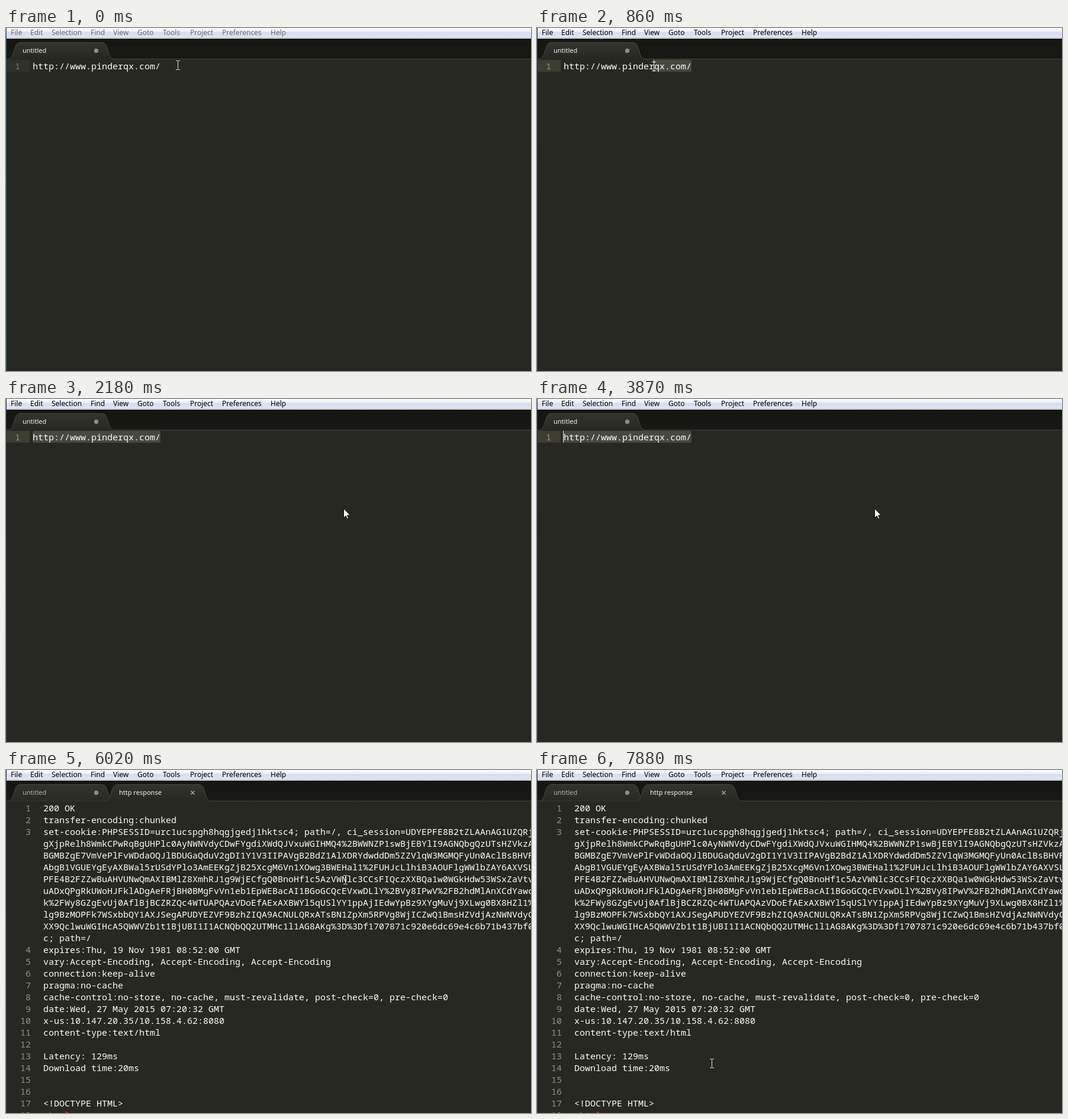
Write an HTML page that moves like this. It is 887 px wide and 581 px high and loops after 8000 ms.

```html
<!DOCTYPE html>
<html lang="en">
<head>
<meta charset="utf-8">
<title>Editor</title>
<style>
  html, body { margin: 0; width: 100%; height: 100%; overflow: hidden; background: #272822; }
  svg { display: block; width: 887px; height: 581px; }
  text { white-space: pre; }
  .code { font: 15px "Noto Sans Mono", "DejaVu Sans Mono", monospace; fill: #fcfcf8; }
  .num { fill: #8f908a; text-anchor: end; }
  .tag { fill: #f92672; }
  .menu { font: 12px "Noto Sans", "Open Sans", sans-serif; fill: #000; }
  .label { font: 11px "Noto Sans", "Open Sans", sans-serif; fill: #f4f4f0; }
  .idle .menu { fill: #6d6d6d; }
  .idle .gutter { fill: #30312a; }
  .idle .first { fill: #8c7468; }
  .idle .edge { fill: url(#edgeIdle); }
  .gutter { fill: #3e3d32; }
  .edge { fill: url(#edge); }
  .tab { stroke: #45463f; }
  .response .back { fill: url(#backTab); }
  .response .back + .label { fill: #b4b4ae; }
  .page2, .response .page1 { display: none; }
  .response .page2 { display: inline; }
</style>
</head>
<body>
<svg id="stage" class="idle" viewBox="0 0 887 581">
  <defs>
    <linearGradient id="bar" x2="0" y2="1">
      <stop offset="0" stop-color="#fbfcfe"/>
      <stop offset=".42" stop-color="#e8edf7"/>
      <stop offset=".46" stop-color="#d5dced"/>
      <stop offset="1" stop-color="#e1e6f6"/>
    </linearGradient>
    <linearGradient id="strip" x2="0" y2="1">
      <stop offset="0" stop-color="#151611"/>
      <stop offset="1" stop-color="#181914"/>
    </linearGradient>
    <linearGradient id="frontTab" x2="0" y2="1">
      <stop offset="0" stop-color="#33342e"/>
      <stop offset="1" stop-color="#272822"/>
    </linearGradient>
    <linearGradient id="backTab" x2="0" y2="1">
      <stop offset="0" stop-color="#32332d"/>
      <stop offset="1" stop-color="#292a24"/>
    </linearGradient>
    <linearGradient id="edgeIdle" x2="0" y2="1">
      <stop offset="0" stop-color="#1d4d7c"/>
      <stop offset="1" stop-color="#2f6b6c"/>
    </linearGradient>
    <linearGradient id="edge" x2="0" y2="1">
      <stop offset="0" stop-color="#1a3450"/>
      <stop offset="1" stop-color="#2a4c58"/>
    </linearGradient>
    <path id="tabShape" d="M5 52.5C12 50 12 42 15 34C17 28 19 24.5 25 24.5H161C167 24.5 169 28 171 34C174 42 174 50 181 52.5"/>
  </defs>

  <rect width="887" height="581" fill="#272822"/>
  <rect y="18" width="887" height="34" fill="url(#strip)"/>
  <rect width="887" height="16" fill="url(#bar)"/>
  <rect y="16" width="887" height="1" fill="#b6bccc"/>
  <rect y="17" width="887" height="1" fill="#f0f0f0"/>
  <rect y="52" width="887" height="1" fill="#43443d"/>
  <g id="menu"></g>

  <use href="#tabShape" class="tab back" fill="url(#frontTab)"/>
  <text class="label" x="28" y="42">untitled</text>
  <circle cx="152.5" cy="38.5" r="3.7" fill="#8b8b85"/>
  <g class="page2">
    <use href="#tabShape" class="tab" x="164" fill="url(#frontTab)"/>
    <rect x="171" y="52" width="172" height="2" fill="#272822"/>
    <text class="label" x="191" y="42">http response</text>
    <path d="M312.5 35.5l6 6m0-6l-6 6" stroke="#a3a39d" stroke-width="1.5"/>
  </g>
  <g class="page1">
    <rect x="7" y="52" width="172" height="2" fill="#272822"/>
    <rect class="gutter" x="1" y="54" width="39" height="20"/>
    <rect id="selection" y="54" height="20" rx="2" fill="#49483e"/>
    <text class="code num first" x="24" y="70">1</text>
    <text class="code" x="45" y="70">http://www.pinderqx.com/</text>
    <rect id="caret" y="54" width="1" height="20" fill="#f8f8f0"/>
  </g>
  <g id="response" class="page2"></g>
  <rect class="edge" width="1" height="581"/>

  <path id="beam" d="M0 .5h3m1 0h3M3.5 1v14M0 15.5h3m1 0h3" stroke="#e4e4e0" fill="none"/>
  <path id="arrow" d="M.5 .7V16.4L4.2 12.9L6.6 18.5L8.9 17.5L6.5 12H11.5Z" fill="#fff" stroke="#000"/>
</svg>

<script>
const $ = id => document.getElementById(id);
const LOOP = 8000, LEFT = 45, CHAR = 9, URL_END = 24;

function addText(parent, cls, x, y, string) {
  const node = document.createElementNS("http://www.w3.org/2000/svg", "text");
  node.setAttribute("class", cls);
  node.setAttribute("x", x);
  node.setAttribute("y", y);
  node.textContent = string;
  parent.append(node);
}

const menu = { File: 8, Edit: 41, Selection: 77, Find: 143, View: 181, Goto: 222,
  Tools: 265, Project: 311, Preferences: 365, Help: 447 };
for (const name in menu) addText($("menu"), "menu", menu[name], 12, name);

// A leading tab marks a wrapped row, which has no line number.
const rows = `200 OK
transfer-encoding:chunked
set-cookie:PHPSESSID=urc1ucspgh8hqgjgedj1hktsc4; path=/, ci_session=UDYEPFE8B2tZLAAnAG1UZQRj
\tgXjpRelh8WmkCPwRqBgUHPlc0AyNWNVdyCDwFYgdiXWdQJVxuWGIHMQ4%2BWWNZP1swBjEBYlI9AGNQbgQzUTsHZVkzA
\tBGMBZgE7VmVePlFvWDdaOQJlBDUGaQduV2gDI1Y1V3IIPAVgB2BdZ1AlXDRYdwddDm5ZZVlqW3MGMQFyUn0AclBsBHVF
\tAbgB1VGUEYgEyAXBWal5rUSdYPlo3AmEEKgZjB25XcgM6Vn1XOwg3BWEHal1%2FUHJcLlhiB3AOUFlgWWlbZAY6AXVSL
\tPFE4B2FZZwBuAHVUNwQmAXIBMlZ8XmhRJ1g9WjECfgQ0BnoHf1c5AzVWNlc3CCsFIQczXXBQa1w0WGkHdw53WSxZaVtv
\tuADxQPgRkUWoHJFklADgAeFRjBH0BMgFvVn1eb1EpWEBacAI1BGoGCQcEVxwDLlY%2BVy8IPwV%2FB2hdMlAnXCdYawc
\tk%2FWy8GZgEvUj0AflBjBCZRZQc4WTUAPQAzVDoEfAExAXBWYl5qUSlYY1ppAjIEdwYpBz9XYgMuVj9XLwg0BX8HZl1%
\tlg9BzMOPFk7WSxbbQY1AXJSegAPUDYEZVF9BzhZIQA9ACNULQRxATsBN1ZpXm5RPVg8WjICZwQ1BmsHZVdjAzNWNVdyC
\tXX9QclwuWGIHcA5QWWVZb1t1BjUBI1I1ACNQbQQ2UTMHc1l1AG8AKg%3D%3Df1707871c920e6dc69e4c6b71b437bf0
\tc; path=/
expires:Thu, 19 Nov 1981 08:52:00 GMT
vary:Accept-Encoding, Accept-Encoding, Accept-Encoding
connection:keep-alive
pragma:no-cache
cache-control:no-store, no-cache, must-revalidate, post-check=0, pre-check=0
date:Wed, 27 May 2015 07:20:32 GMT
x-us:10.147.20.35/10.158.4.62:8080
content-type:text/html

Latency: 129ms
Download time:20ms


<!DOCTYPE HTML>
<    >`.split("\n");

let line = 0;
rows.forEach((row, i) => {
  const y = 70 + i * 20;
  if (row[0] !== "\t") addText($("response"), "code num", 42, y, ++line);
  addText($("response"), "code", 63, y, row.trim());
});
addText($("response"), "code tag", 72, 70 + (rows.length - 1) * 20, "html");

// Pointer: time, left, top, shape.
const pointer = [
  [0, 287, 55, "beam"], [280, 283, 57, "beam"], [560, 274, 57, "beam"],
  [710, 236, 57, "beam"], [860, 194, 57, "beam"], [980, 150, 57, "beam"],
  [1110, 105, 57, "beam"], [1230, 67, 57, "beam"], [1380, 39, 57, "beam"],
  [1500, 37, 57, "beam"], [1640, 165, 96, "arrow"], [1760, 359, 160, "arrow"],
  [1910, 570, 185, "arrow"], [6020, 570, 178, "beam"], [7730, 368, 402, "beam"],
  [7880, 292, 489, "beam"]
];
const blink = [[0, 0], [560, 1], [2060, .5], [2180, 0], [2740, .5], [2890, 1],
  [3160, .5], [3290, 0], [3720, .5], [3870, 1]];

const at = (steps, t) => steps.findLast(step => step[0] <= t);

function draw(t) {
  const [, x, y, shape] = at(pointer, t);
  for (const id of ["beam", "arrow"]) {
    $(id).setAttribute("transform", `translate(${x} ${y})`);
    $(id).style.display = id === shape ? "" : "none";
  }

  // The selection follows the dragged pointer to the nearest character.
  let start = URL_END;
  if (t >= 1380) start = 0;
  else if (t >= 710) start = Math.round((x + 3 - LEFT) / CHAR);
  const startX = LEFT + start * CHAR;
  $("selection").setAttribute("x", startX);
  $("selection").setAttribute("width", (URL_END - start) * CHAR);
  $("caret").setAttribute("x", startX - 1);
  $("caret").setAttribute("opacity", at(blink, t)[1]);

  $("stage").setAttribute("class", t < 560 ? "idle" : t < 4280 ? "" : "response");
}

function tick(now) {
  draw(now % LOOP);
  requestAnimationFrame(tick);
}
draw(0);
requestAnimationFrame(tick);
</script>
</body>
</html>
```
